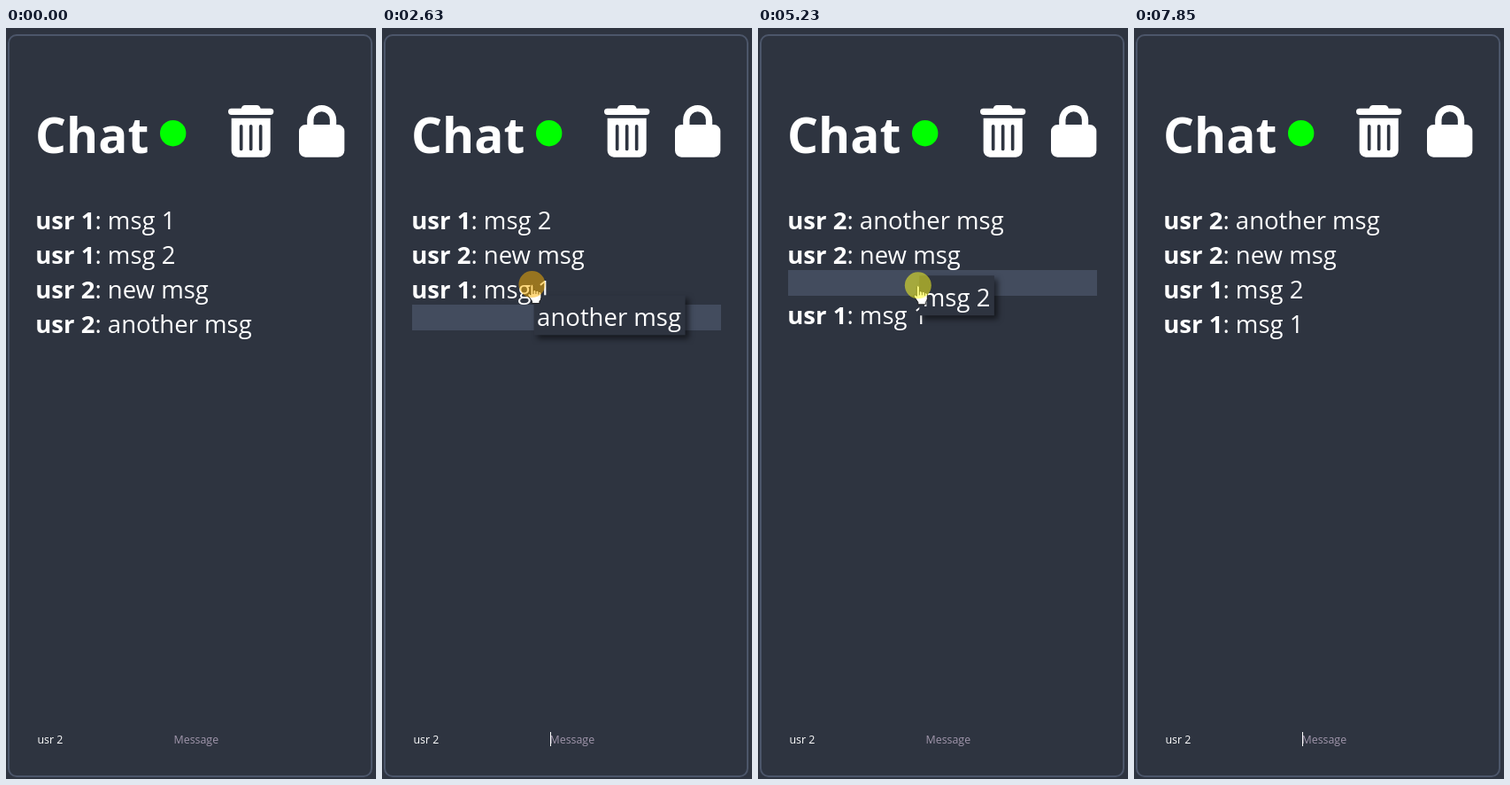
These frames come from a looping animation (418x847 px, 8 s). An HTML page:

```html
<!DOCTYPE html>
<html lang="en">
<head>
<meta charset="utf-8">
<title>Chat</title>
<style>
  html, body { margin: 0; width: 100%; height: 100%; overflow: hidden; background: #2e3440; }
  svg { display: block; width: 418px; height: 847px; }
  text { font-family: "Open Sans", "Noto Sans", sans-serif; font-size: 27.5px; fill: #fff; white-space: pre; }
  .b { font-weight: 700; }
  .title { font-size: 55px; }
  .field { font-size: 12.4px; }
  .hint { fill: #a096ab; }
  #ghost { filter: drop-shadow(4px 4px 3px rgba(0, 0, 0, .55)); }
</style>
</head>
<body>
<svg viewBox="0 0 418 847">
  <rect width="418" height="847" fill="#2e3440"/>
  <rect x="3" y="8" width="410" height="836" rx="9" fill="none" stroke="#4c566a" stroke-width="2"/>
  <text class="b title" x="33" y="141">Chat</text>
  <circle id="status" cx="188.7" cy="118.7" r="14.7"/>
  <g fill="#fff">
    <g transform="translate(251 87) scale(.1146)">
      <path d="M135 18C141 7 152 0 164 0H284c12 0 23 7 29 18L320 32h96a32 32 0 0 1 0 64H32a32 32 0 0 1 0-64h96zM32 128H416V448a64 64 0 0 1-64 64H96a64 64 0 0 1-64-64z"/>
      <path d="M128 208V432M224 208V432M320 208V432" stroke="#2e3440" stroke-width="32" stroke-linecap="round"/>
    </g>
    <path transform="translate(331 87) scale(.1146)" fill-rule="evenodd" d="M144 144v48H304V144a80 80 0 0 0-160 0zM80 192V144a144 144 0 0 1 288 0v48h16a64 64 0 0 1 64 64V448a64 64 0 0 1-64 64H64a64 64 0 0 1-64-64V256a64 64 0 0 1 64-64z"/>
  </g>
  <rect id="bar" x="34" width="349" height="29" fill="#434c5e"/>
  <g id="rows"></g>
  <text class="field" x="35.5" y="807">usr 2</text>
  <text class="field hint" x="189.5" y="807">Message</text>
  <rect id="caret" x="190" y="794" width="1" height="16" fill="#fff"/>
  <g id="ghost">
    <rect height="45" fill="#2e3440"/>
    <text x="3.5" y="35"></text>
  </g>
  <g id="cursor">
    <path id="hand" d="M-1.5 1.5Q0-1 1.5 1.5V7Q3 5.5 4.5 7.5 6 6 7.5 8.5 9.5 7.5 10.5 10V15Q10 18 8.5 19V21.5H0V19L-4.5 12.5Q-5 10-2.8 10.5L-1.5 12Z M1.5 7V11M4.5 7.5V11M7.5 8.5V11.5" fill="#fff" stroke="#111" stroke-width=".9"/>
    <path id="arrow" d="M.5.5V16.5L4.2 13 7 19.5 9.6 18.4 6.9 12H11.8Z" fill="#fff" stroke="#111"/>
    <circle id="halo" r="15"/>
  </g>
</svg>
<script>
const LOOP = 8000, ROW = 39, BAR = 29, TOP = 195, LAG = 28;
const BLINK = 530, FOCUS = 1220, BLINK_END = FOCUS + 10 * BLINK;
const YELLOW = 'rgba(255,255,30,.52)', ORANGE = 'rgba(255,180,0,.5)';

const el = id => document.getElementById(id);
const show = (node, on) => { node.style.display = on ? '' : 'none'; };
const move = (node, x, y) => node.setAttribute('transform', `translate(${x} ${y})`);
const clamp = k => Math.max(0, Math.min(1, k));
const ease = k => k * k * (3 - 2 * k);

const messages = [['usr 1', 'msg 1'], ['usr 1', 'msg 2'], ['usr 2', 'new msg'], ['usr 2', 'another msg']];

const drags = [
  { id: 0, grab: 1080, drop: 1850, color: YELLOW },
  { id: 3, grab: 2500, drop: 3170, color: ORANGE },
  { id: 1, grab: 4940, drop: 5700, color: YELLOW },
  { id: 1, grab: 6450, drop: 6950, color: YELLOW }
];

// pointer legs: start, duration, then x, y and list slot at the end
const legs = [
  [220, 780, 137, 219, 0],
  [1080, 350, 148, 225, 0],
  [1430, 219, 160, 309, 2],
  [1970, 330, 170, 325, 3],
  [2500, 370, 168, 200, 0],
  [3170, 690, 177, 262, 1],
  [4940, 90, 178, 235, 0],
  [5030, 370, 183, 333, 3],
  [5800, 80, 189, 373, 3],
  [6170, 120, 192, 337, 3],
  [6450, 400, 196, 281, 2],
  [6990, 200, 267, 388, 2],
  [7650, 200, 424, 755, 2]
];

const rows = messages.map(([user, text]) => {
  const row = document.createElementNS('http://www.w3.org/2000/svg', 'text');
  row.innerHTML = `<tspan class="b">${user}</tspan>: ${text}`;
  row.setAttribute('x', 33.3);
  el('rows').append(row);
  return row;
});
const [ghostBox, ghostText] = el('ghost').children;

function pointer(t) {
  let pos = [391, 847, 0];
  for (const [start, duration, ...end] of legs) {
    const k = ease(clamp((t - start) / duration));
    pos = pos.map((v, i) => v + (end[i] - v) * k);
  }
  return pos;
}

// replay every drag begun so far; each puts its message in the pointer's slot
function listOrder(t) {
  let order = [0, 1, 2, 3];
  for (const { id, grab, drop } of drags) {
    if (t < grab) break;
    const slot = Math.ceil(pointer(Math.min(t, drop))[2]);
    order = order.filter(other => other !== id);
    order.splice(slot, 0, id);
  }
  return order;
}

function drawList(order, heldId) {
  let y = TOP;
  for (const id of order) {
    const held = id === heldId;
    show(rows[id], !held);
    if (held) el('bar').setAttribute('y', y);
    else rows[id].setAttribute('y', y + 32);
    y += held ? BAR : ROW;
  }
}

function drawGhost(t, drag) {
  const [x, y] = pointer(t - LAG);
  ghostText.textContent = messages[drag.id][1];
  ghostBox.setAttribute('width', ghostText.getComputedTextLength() + 8);
  move(el('ghost'), x + 2, y);
  el('halo').setAttribute('fill', drag.color);
}

function draw(t) {
  const drag = drags.find(d => t >= d.grab && t < d.drop);
  const [x, y] = pointer(t);
  drawList(listOrder(t), drag?.id);
  for (const id of ['bar', 'ghost', 'halo']) show(el(id), drag);
  if (drag) drawGhost(t, drag);

  const overRows = y < TOP + 4 * ROW;
  show(el('cursor'), t >= 220 && t < 7850);
  show(el('hand'), overRows);
  show(el('arrow'), !overRows);
  move(el('cursor'), x, y);

  const beat = Math.floor((Math.min(t, BLINK_END) - FOCUS) / BLINK);
  show(el('caret'), beat >= 0 && beat % 2 === 0);
  el('status').setAttribute('fill', t >= 3450 && t < 4650 ? '#f00' : '#0f0');
}

const start = performance.now();
function tick() {
  draw((performance.now() - start) % LOOP);
  requestAnimationFrame(tick);
}
tick();
</script>
</body>
</html>
```
